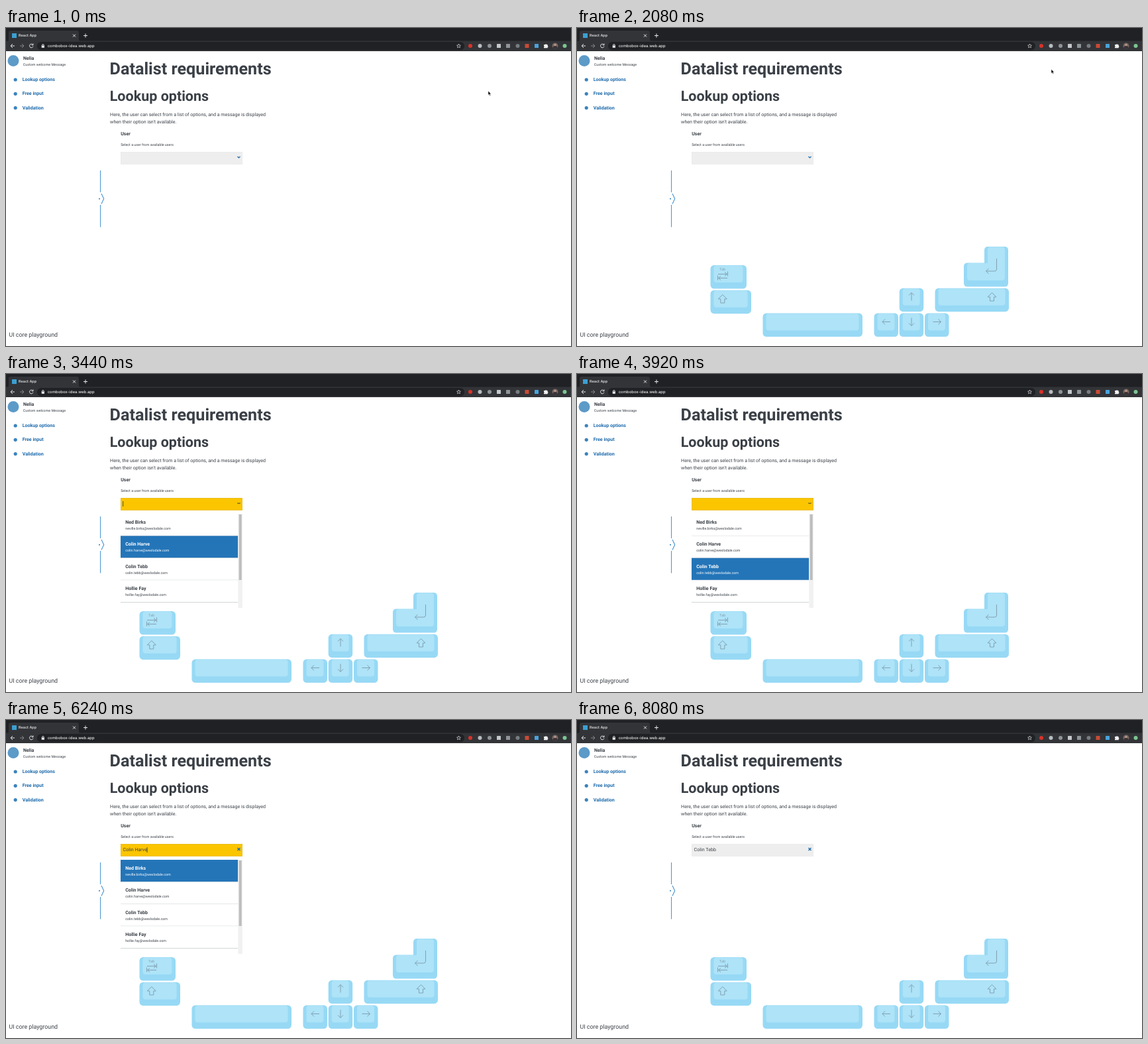
An HTML page for the animation above (8160 ms loop, 853 by 480 pixels).

```html
<!DOCTYPE html>
<html lang="en">
<head>
<meta charset="utf-8">
<title>Datalist requirements</title>
<style>
  html, body { margin: 0; width: 100%; height: 100%; overflow: hidden; background: #fff; }
  svg { display: block; width: 853px; height: 480px; font: 7.1px Roboto, sans-serif; text-rendering: geometricPrecision; }
  text { fill: #3b4047; }
  .b { font-weight: 700; }
  .s { font-size: 5.33px; }
  .nav { fill: #1f6cad; font-weight: 700; }
  .ui { font-family: Inter, sans-serif; fill: #eee; font-weight: 500; }
  .line { fill: none; stroke: #4794cf; }
  .icon { fill: none; stroke: #e4e6e8; stroke-width: 1; }
  .side { fill: #97d9f5; }
  .face { fill: #aee3f8; }
  .pressed .side { fill: #7cc6e8; }
  .pressed .face { fill: #96d4f0; }
  .sign { fill: none; stroke: #83a1b1; stroke-width: 1; }
  .row rect { fill: #fff; }
  .row.active rect { fill: #2475b8; }
  .row.active text { fill: #fff; }
  #field { fill: #eee; stroke: #e6e6e6; stroke-width: .6; }
  #field.open { fill: #fbc500; stroke: #e3b000; }
</style>
</head>
<body>
<svg viewBox="0 0 853 480">
  <!-- browser bar -->
  <rect width="853" height="35" fill="#202124"/>
  <path d="M0 19.500H2Q4 19.500 4 17V7Q4 4 7 4H107Q110 4 110 7V17Q110 19.500 112 19.500H853V35H0Z" fill="#323438"/>
  <rect x="47" y="21" width="645" height="12.500" rx="6.200" fill="#202124"/>
  <rect x="9" y="8" width="7" height="7" fill="#3b9fd1"/>
  <text class="ui" x="19" y="13" font-size="5.500">React App</text>
  <text class="ui" x="62.700" y="29" font-size="5.950">combobox-idea.web.app</text>
  <g class="icon">
    <path d="M101 9.500l4 4m0-4l-4 4M117 11.500h6m-3-3v6"/>
    <path d="M13 27H7m3-3l-3 3 3 3"/>
    <path d="M21 27h6m-3-3l3 3-3 3" stroke="#85888b"/>
    <path d="M40.500 25.200a2.800 2.800 0 1 0 .5 2.500M41 23.500v2.300h-2.300"/>
    <path d="M54.500 27v-1.200a1.300 1.300 0 0 1 2.600 0V27"/>
    <path d="M683.500 24l.9 2 2 .2-1.500 1.400.5 2.100-1.900-1.100-1.900 1.100.5-2.100-1.500-1.400 2-.2z" stroke-width=".7"/>
  </g>
  <rect x="53.700" y="26.500" width="4.200" height="3.300" fill="#e4e6e8"/>
  <circle id="halo" cx="801" cy="27" r="6.500" fill="#5b5f64"/>
  <g id="extensions"></g>
  <path d="M812 25h2a1.200 1.200 0 0 1 2.300 0h1.400v1.800a1.200 1.200 0 0 1 0 2.200v1.300H812v-1.600a1.200 1.200 0 0 0 0-2z" fill="#f0f0f0"/>
  <circle cx="829" cy="27" r="4.500" fill="#7b6660"/>
  <path d="M825.500 30a3.500 3 0 0 1 7 0A4.500 4.500 0 0 1 825.500 30" fill="#393337"/>
  <circle cx="829" cy="25.500" r="1.700" fill="#b49a8d"/>

  <!-- side menu -->
  <circle cx="11" cy="49.500" r="8.500" fill="#5c9ac8"/>
  <text class="b" x="26" y="47.500">Nelia</text>
  <text class="s" x="25.800" y="56.500">Custom welcome Message</text>
  <g id="menu"></g>
  <path class="line" d="M142.500 215V248M142.500 267V300.500"/>
  <path class="line" d="M144 250l3.700 7.700-3.700 7.800" stroke-width="1.100"/>
  <circle cx="141" cy="257.700" r="1" fill="#2d7dbd"/>
  <text x="4.400" y="465.500" font-size="8.900">UI core playground</text>

  <!-- content -->
  <text class="b" x="156.500" y="69.500" font-size="25.200">Datalist requirements</text>
  <text class="b" x="156.700" y="110" font-size="21.500">Lookup options</text>
  <text x="157.100" y="133.300">Here, the user can select from a list of options, and a message is displayed</text>
  <text x="157.100" y="144">when their option isn't available.</text>
  <text class="b" x="173.200" y="162">User</text>
  <text class="s" x="173.200" y="178">Select a user from available users</text>
  <rect id="field" x="173.300" y="187.300" width="183.400" height="18.200"/>
  <text id="value" x="176.600" y="198.300"></text>
  <path id="caret" d="M0 192v8" stroke="#26303a" stroke-width=".8"/>
  <path id="toggle" fill="none" stroke-width="1.400"/>
  <g id="keys"></g>
  <g id="list">
    <rect x="173" y="211" width="184" height="142" fill="#fff"/>
    <g id="rows"></g>
    <rect x="350.300" y="211" width="6.700" height="142" fill="#f1f1f1"/>
    <rect x="351.700" y="212" width="4" height="99" fill="#bdbdbd"/>
  </g>

  <!-- extension popup -->
  <g id="popup">
    <rect x="768.500" y="33.500" width="39" height="24" rx="1" fill="#bbb" opacity=".55"/>
    <rect x="769" y="34" width="37.500" height="22.500" fill="#fff"/>
    <rect x="772.500" y="37.500" width="31" height="15" fill="#e9e9e9" stroke="#666" stroke-width=".9"/>
    <g font-family="Liberation Sans, Arial, sans-serif" font-size="6" text-anchor="middle">
      <text id="verb" x="788" y="44" style="fill:#000"></text>
      <text x="788" y="50.300" style="fill:#000">keyboard</text>
    </g>
  </g>
  <path id="cursor" d="M0 0V6.300L1.400 5 2.500 7.400 3.500 6.900 2.500 4.700H4.400Z" fill="#000" stroke="#fff" stroke-width=".5"/>
</svg>
<script>
const LOOP = 8160, STEP = 80;
const $ = id => document.getElementById(id);
const show = (id, on) => $(id).style.display = on ? '' : 'none';

// Toolbar badges: x, colour, round
$('extensions').innerHTML = [
  [701, '#d8322a', 1], [715.5, '#b9bdc1', 1], [730, '#8f9498', 1], [744, '#c5c8cb', 0], [758, '#8f9498', 0],
  [772.5, '#777c80', 1], [786.5, '#c94a35', 0], [801, '#4aa3dc', 0], [843.5, '#7cc691', 1]
].map(([x, fill, round]) =>
  `<rect x="${x - 3}" y="24" width="6" height="6" rx="${round ? 3 : .5}" fill="${fill}"/>`).join('');

$('menu').innerHTML = ['Lookup options', 'Free input', 'Validation'].map((label, i) =>
  `<circle cx="14.200" cy="${78 + i * 21.3}" r="2.600" fill="#3b83bd"/>
   <text class="nav" x="24.700" y="${80 + i * 21.3}">${label}</text>`).join('');

const people = [
  ['Ned Birks', 'neville.birks'], ['Colin Harve', 'colin.harve'],
  ['Colin Tebb', 'colin.tebb'], ['Hollie Fay', 'hollie.fay']
];
$('rows').innerHTML = people.map(([name, mail], i) => {
  const y = 211 + i * 33.4;
  return `<g class="row"><rect x="173" y="${y}" width="177.300" height="33.400"/>
    <path d="M173 ${y + 33.4}h177.300" stroke="#c4c7ca" stroke-width=".8"/>
    <text class="b" x="180.200" y="${y + 15}">${name}</text>
    <text class="s" x="180.200" y="${y + 23.8}">${mail}@wexlodale.com</text></g>`;
}).join('');
const rows = document.querySelectorAll('.row');

// Keyboard
const box = (x, y, w, h, r, cls) => `<rect class="${cls}" x="${x}" y="${y}" width="${w}" height="${h}" rx="${r}"/>`;
const key = (id, x, y, w, sign = '') => `<g id="${id}">${box(x, y, w, 35.5, 5.5, 'side')}
  ${box(x + 5, y + .5, w - 10.5, 25.5, 4, 'face')}<path class="sign" d="${sign}"/></g>`;
const shift = (x, y) => `M${x} ${y}l-6.500 6.500h3.500v6h6v-6h3.500z`;
$('keys').innerHTML =
  key('tab', 201.5, 358, 54.5, 'M213 371.500h13m-3-3l3.500 3-3.500 3m4.500-7v7M227 377.500h-13m3-3l-3.500 3 3.500 3m-4.500-7v7') +
  '<text x="219.500" y="366" font-size="5.500" text-anchor="middle" style="fill:#83a1b1">Tab</text>' +
  key('shiftLeft', 201.5, 395.7, 61.5, shift(219.8, 402.5)) +
  key('space', 280.5, 430.5, 150.5) +
  key('left', 448.5, 430.5, 36.5, 'M473 443.500h-12m4-4l-4 4 4 4') +
  key('down', 486.7, 430.5, 36.5, 'M505 437.500v12m-4-4l4 4 4-4') +
  key('right', 525, 430.5, 36.5, 'M537.500 443.500h12m-4-4l4 4-4 4') +
  key('up', 486.7, 392.7, 36.5, 'M505 411.500v-12m-4 4l4-4 4 4') +
  key('shiftRight', 540.5, 392.7, 111.5, shift(626.5, 399.5)) +
  `<g id="enter">
    <path class="side" d="M620.500 330H645.500Q651 330 651 335.500V385Q651 390.500 645.500 390.500H589.500Q584 390.500 584 385V360Q584 354.500 589.500 354.500H615V335.500Q615 330 620.500 330Z"/>
    <path class="face" d="M624 330.500H642Q646 330.500 646 334.500V377Q646 381 642 381H593Q589 381 589 377V359Q589 355 593 355H620V334.500Q620 330.500 624 330.500Z"/>
    <path class="sign" d="M633.500 348v16q0 3-3 3h-13m4-4l-4 4 4 4"/></g>`;

const presses = [
  ['tab', 2320], ['down', 2960], ['down', 3280], ['down', 3600], ['up', 4160], ['enter', 4640],
  ['enter', 5680], ['down', 6080], ['down', 6400], ['down', 6720], ['enter', 7040]
];
// Combobox states: time, chosen person, open, highlighted row
const states = [
  [0, -1, 0, -1], [2400, -1, 1, -1], [3040, -1, 1, 0], [3360, -1, 1, 1], [3680, -1, 1, 2], [4240, -1, 1, 1],
  [4720, 1, 0, -1], [5760, 1, 1, -1], [6160, 1, 1, 0], [6480, 1, 1, 1], [6800, 1, 1, 2], [7120, 2, 0, -1]
];
// Pointer stops: time, x, y
const stops = [[0, 728, 95], [560, 800, 27], [880, 789, 46], [960, 787, 48], [1040, 773, 56], [1600, 716, 62.2], [LOOP, 716, 62.2]];

function pointer(t) {
  const i = stops.findIndex(s => s[0] > t), [t0, x0, y0] = stops[i - 1], [t1, x1, y1] = stops[i];
  const p = (t - t0) / (t1 - t0), e = p * p * (3 - 2 * p);
  return [x0 + (x1 - x0) * e, y0 + (y1 - y0) * e];
}

function togglePath(chosen, open) {
  if (chosen >= 0) return 'M349.500 193l4 4m0-4l-4 4';
  return open ? 'M349.200 194.600l2.300 1 2.300-1' : 'M349.500 194l2 1.900 2-1.900';
}

function draw(t) {
  const [, chosen, open, active] = states.filter(s => s[0] <= t).pop();
  const focusTime = t < 5760 ? 2400 : 5760;

  $('field').classList.toggle('open', !!open);
  $('value').textContent = chosen < 0 ? '' : people[chosen][0];
  $('toggle').setAttribute('d', togglePath(chosen, open));
  $('toggle').setAttribute('stroke', open && chosen < 0 ? '#756528' : '#1f6cad');
  $('caret').setAttribute('transform', `translate(${176.7 + (chosen < 0 ? 0 : $('value').getComputedTextLength())})`);
  show('caret', open && (t - focusTime) % 1000 < 500);
  show('list', open);
  rows.forEach((row, i) => row.classList.toggle('active', i === active));

  const popup = t >= 640 && t < 1280;
  show('popup', popup);
  show('halo', popup);
  $('verb').textContent = t < 960 ? 'Show' : 'Hide';
  show('keys', t >= 960);
  for (const group of $('keys').querySelectorAll('g'))
    group.classList.toggle('pressed', presses.some(([id, at]) => id === group.id && t >= at && t < at + 160));

  $('cursor').setAttribute('transform', `translate(${pointer(t)})`);
  show('cursor', t < 2960 || (t >= 7840 && t < 8080));
}

const start = performance.now();
function tick() {
  const t = (performance.now() - start) % LOOP;
  draw(Math.floor(t / STEP) * STEP);
  requestAnimationFrame(tick);
}
tick();
</script>
</body>
</html>
```
